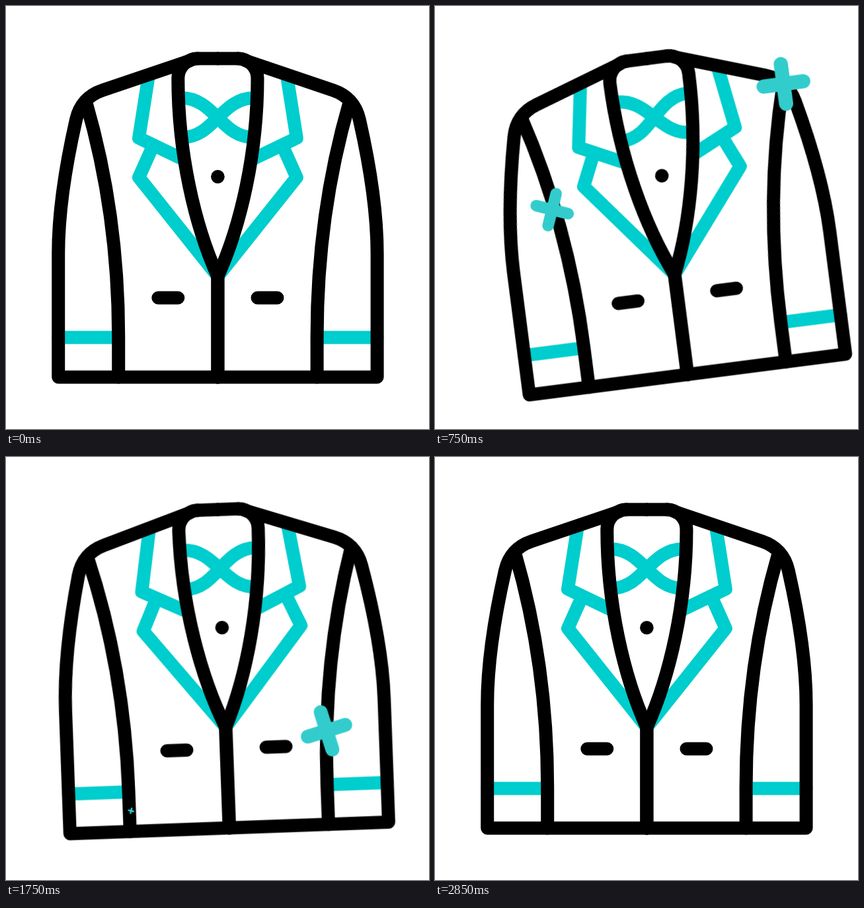
Animation of 640 by 640 pixels, one loop 2.9 s. Source, as an HTML page:

```html
<!DOCTYPE html>
<html lang="en">
<head>
<meta charset="utf-8">
<title>Jacket</title>
<style>
  html, body { margin: 0; width: 100%; height: 100%; overflow: hidden; background: #fff; }
  svg { display: block; width: 100%; height: 100%; }
  path { fill: none; stroke-width: 20; stroke-linecap: round; stroke-linejoin: round; }
  .trim { stroke: #00cdcd; }
  .line { stroke: #000; }
  .mark { stroke: #3cc; }

  /* Damped swing around the neck: a new extreme every 400 ms */
  .jacket {
    transform-origin: 320.4px 79.5px;
    animation: swing 2900ms cubic-bezier(.3333, 0, .6667, 1) infinite;
  }
  @keyframes swing {
    0% { transform: rotate(0deg); }
    13.793% { transform: rotate(8deg); }
    27.586% { transform: rotate(-8deg); }
    41.379% { transform: rotate(4deg); }
    55.172% { transform: rotate(-4deg); }
    68.966% { transform: rotate(2deg); }
    82.759% { transform: rotate(-2deg); }
    96.552%, 100% { transform: rotate(0deg); }
  }

  /* Stitches: 400 ms pop, slow spin, quick fade */
  .stitch {
    opacity: 0;
    transform-origin: 0 0;
    animation: spin 2900ms linear var(--at) infinite, fade 2900ms linear var(--at) infinite;
  }
  @keyframes spin {
    0% { transform: rotate(0deg) scale(0); }
    13.793% { transform: rotate(127deg) scale(1); }
    34.483%, 100% { transform: rotate(217deg) scale(1.12); }
  }
  @keyframes fade {
    0%, 31.034% { opacity: 1; }
    34.483%, 100% { opacity: 0; }
  }
</style>
</head>
<body>
<svg viewBox="0 0 640 640">
  <defs>
    <g id="half-trim">
      <path class="trim" d="M216 104.5 L201 199.7 L266 231 M222 212.5 L201 259.3 L320.4 409 M79.2 501.5 H170"/>
      <path class="trim" d="M265 139 C290 139 305.4 154 320.4 169 C335.4 184 350 199 375 199"/>
    </g>
    <g id="half-line">
      <path class="line" d="M320.4 561.5 H79.2 V375 C79.2 310 91 238 106 172 C111 150 124 135 146 127.5 L276 83.5 Q283 79.5 290 79.5 H320.4"/>
      <path class="line" d="M121 145 C155 262 170.2 385 170.2 500 V561.5"/>
      <path class="line" d="M290.3 79.5 A30 30 0 0 0 260.3 109.5 C260.3 222 285.4 332 320.4 409 V561.5 M230.3 441.5 H260.3"/>
    </g>
    <path id="cross" class="mark" d="M-28.3 0 H28.3 M0 -28.3 V28.3"/>
  </defs>
  <g class="jacket">
    <use href="#half-trim"/>
    <use href="#half-trim" transform="matrix(-1 0 0 1 640.8 0)"/>
    <use href="#half-line"/>
    <use href="#half-line" transform="matrix(-1 0 0 1 640.8 0)"/>
    <circle cx="320.4" cy="258.2" r="10.3"/>
    <g transform="translate(520.6 144)"><g class="stitch" style="--at: 0ms"><use href="#cross"/></g></g>
    <g transform="translate(149.2 288)"><g class="stitch" style="--at: 400ms"><use href="#cross"/></g></g>
    <g transform="translate(472.7 420)"><g class="stitch" style="--at: 1100ms"><use href="#cross"/></g></g>
    <g transform="translate(172.8 530.3)"><g class="stitch" style="--at: 1700ms"><use href="#cross"/></g></g>
  </g>
</svg>
</body>
</html>
```
